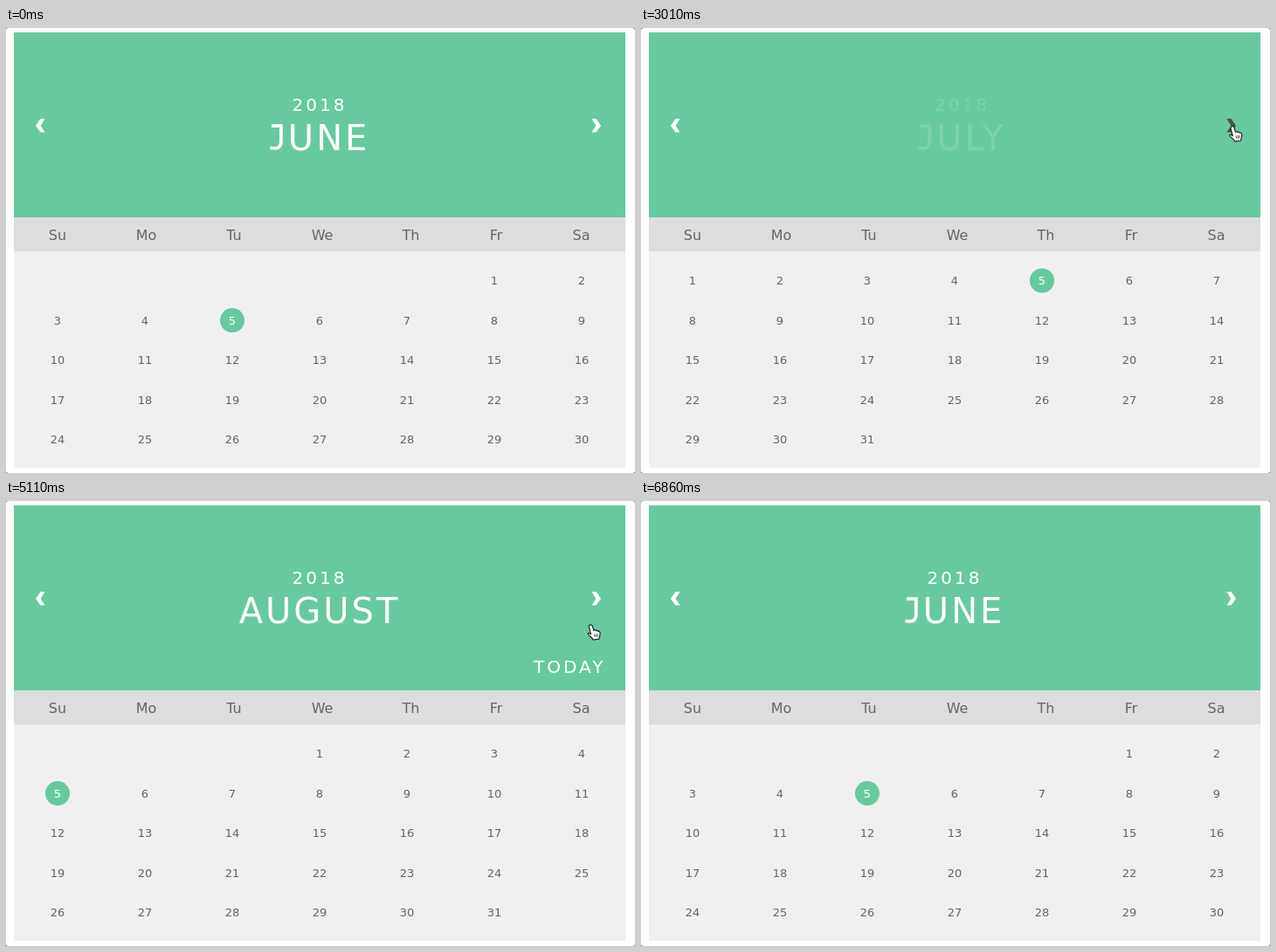
These frames come from a looping animation (720x510 px, 6.93 s). An HTML page with a canvas:

```html
<!DOCTYPE html>
<html lang="en">
<head>
<meta charset="utf-8">
<title>Calendar</title>
<style>
  html, body { margin: 0; width: 720px; height: 510px; overflow: hidden; background: #777; }
  canvas { display: block; }
</style>
</head>
<body>
<canvas id="stage" width="720" height="510"></canvas>
<script>
const ctx = document.getElementById('stage').getContext('2d');
const LOOP = 6930, STEP = 70, LEAVE = 800, ENTER = 300;
const GREEN = '#68c99e', GREY = '#666', DARK = '#46534d';
const WEEKDAYS = [['Su', 59], ['Mo', 160.5], ['Tu', 261], ['We', 362], ['Th', 463.5], ['Fr', 561], ['Sa', 658.5]];
const MONTHS = ['JUNE', 'JULY', 'AUGUST'];

// Times at which the next month replaces the old one
const changes = [{ at: 2970, month: 1 }, { at: 4700, month: 2 }, { at: 6540, month: 0 }];

// Pointer positions: time, x, y
const pointerPath = [
  [1050, 668, 250], [1250, 678, 112], [1400, 673, 112], [4200, 673, 112], [4480, 672, 119],
  [4900, 672, 119], [5450, 650, 192], [6500, 650, 192], [6800, 630, 512]
];

const letterJ = new Path2D('M2.3-27.4H13.2V-9.5C13.2-3.6 10.6-1.6 6-1.6Q3-1.6 .8-2.3');
const chevron = new Path2D('M39.4 104H44.6L39.6 112L44.6 119.5H39.4L34 112Z');
const hand = new Path2D('M3 1C4.5 .1 5.5 1 6 2.5L7.5 7C8.5 6.3 9.5 6.5 10 7.5C11 6.8 12 7.3 12.3 8.2C13.5 7.6 14.6 8.5 14.7 10C15 13 14 14 13.5 17L7 18C5 15 3 14 1 11.5C.3 10.3 1.8 9.6 3.5 11L4.2 11.3L2 3C1.7 2 2 1.3 3 1Z');
const fingers = new Path2D('M8 11.5L8.6 14.5M10 11L10.5 14.5M12 11V14.5');
const beam = new Path2D('M-3.5-7.5Q-.5-7.5 0-6Q.5-7.5 3.5-7.5M0-6V6M-3.5 7.5Q-.5 7.5 0 6Q.5 7.5 3.5 7.5M-2 2H2');
const arrow = new Path2D('M0 0V15L3.6 11.8L6 17.2L8.5 16.1L6.1 10.8H11Z');

const clamp = v => Math.min(1, Math.max(0, v));

function bezier(x1, y1, x2, y2) {
  const curve = (a, b, s) => 3 * (1 - s) ** 2 * s * a + 3 * (1 - s) * s * s * b + s ** 3;
  return x => {
    if (x <= 0 || x >= 1) return clamp(x);
    let low = 0, high = 1;
    for (let i = 0; i < 24; i++) {
      const mid = (low + high) / 2;
      if (curve(x1, x2, mid) < x) low = mid; else high = mid;
    }
    return curve(y1, y2, low);
  };
}
const easeOut = bezier(1, .5, .8, 1);
const ease = bezier(.25, .1, .25, 1);
const smooth = bezier(.42, 0, .58, 1);

function rect(color, x, y, w, h) {
  ctx.fillStyle = color;
  ctx.fillRect(x, y, w, h);
}

function text(str, x, y, size, color, align = 'center', spacing = 0) {
  ctx.font = `${size}px "DejaVu Sans", sans-serif`;
  ctx.letterSpacing = spacing + 'px';
  ctx.textAlign = align;
  ctx.fillStyle = color;
  ctx.fillText(str, x, y);
}

function shape(path, x, y, fill, stroke, width = 1) {
  ctx.save();
  ctx.translate(x, y);
  ctx.lineWidth = width;
  if (fill) { ctx.fillStyle = fill; ctx.fill(path); }
  if (stroke) { ctx.strokeStyle = stroke; ctx.stroke(path); }
  ctx.restore();
}

// Draws content faded and shifted: 0 is gone, 1 is in place
function slideFade(shown, draw) {
  ctx.save();
  ctx.globalAlpha = shown;
  ctx.translate(10 * (1 - shown), 0);
  draw();
  ctx.restore();
}

function monthName(name) {
  ctx.font = '40px "DejaVu Sans", sans-serif';
  ctx.letterSpacing = '3px';
  const hasJ = name[0] === 'J', rest = hasJ ? name.slice(1) : name;
  const lead = hasJ ? 21.2 : 0;
  const left = 359 - (lead + ctx.measureText(rest).width) / 2;
  if (hasJ) shape(letterJ, left, 139.5, null, '#fff', 3.8);
  text(rest, left + lead, 139.5, 40, '#fff', 'left', 3);
}

function days(month) {
  const first = new Date(2018, 5 + month, 1).getDay();
  const count = new Date(2018, 6 + month, 0).getDate();
  for (let day = 1; day <= count; day++) {
    const cell = first + day - 1;
    const x = 59 + 100 * (cell % 7), y = 289.5 + 45.55 * Math.floor(cell / 7);
    if (day === 5) {
      ctx.fillStyle = GREEN;
      ctx.beginPath();
      ctx.arc(x, y, 14, 0, 7);
      ctx.fill();
    }
    text(day, x, y + 4.7, 13, day === 5 ? '#fff' : GREY);
  }
}

function pointer(t) {
  const next = pointerPath.findIndex(p => p[0] > t);
  if (next < 1) return;
  const [t0, x0, y0] = pointerPath[next - 1], [t1, x1, y1] = pointerPath[next];
  const k = smooth((t - t0) / (t1 - t0));
  const x = x0 + (x1 - x0) * k, y = y0 + (y1 - y0) * k;
  if (t >= 1400 && t < 6540) {
    shape(hand, x, y, '#fff', '#222', 1.2);
    shape(fingers, x, y, null, '#222', .8);
  } else if (y < 217) {
    shape(beam, x, y, null, '#222', 1.2);
  } else {
    shape(arrow, x, y, '#111', '#fff');
  }
}

function draw(t) {
  let month = 0, shown = 1;
  for (const change of changes) {
    if (t >= change.at) {
      month = change.month;
      shown = ease((t - change.at) / ENTER);
    } else if (t > change.at - LEAVE) {
      shown = 1 - easeOut((t - change.at + LEAVE) / LEAVE);
    }
  }

  rect('#777', 0, 0, 720, 510);
  ctx.fillStyle = '#fff';
  ctx.beginPath();
  ctx.roundRect(0, 0, 720, 510, 3);
  ctx.fill();
  rect(GREEN, 9, 5, 700, 212);
  rect('#ddd', 9, 217, 700, 39);
  rect('#f0f0f0', 9, 256, 700, 248);

  slideFade(shown, () => {
    text('2018', 327.5, 95, 20, '#fff', 'left', 3);
    monthName(MONTHS[month]);
    if (month === 2) text('TODAY', 604, 196.5, 20, '#fff', 'left', 3);
  });

  shape(chevron, 0, 0, '#fff');
  ctx.save();
  ctx.translate(715, 0);
  ctx.scale(-1, 1);
  shape(chevron, 0, 0, t >= 1400 && t < 5050 ? DARK : '#fff');
  ctx.restore();

  for (const [name, x] of WEEKDAYS) text(name, x, 243, 16, GREY);
  days(month);
  pointer(t);
}

const start = performance.now();
function tick() {
  const t = (performance.now() - start) % LOOP;
  draw(Math.floor(t / STEP) * STEP);
  requestAnimationFrame(tick);
}
tick();
</script>
</body>
</html>
```
